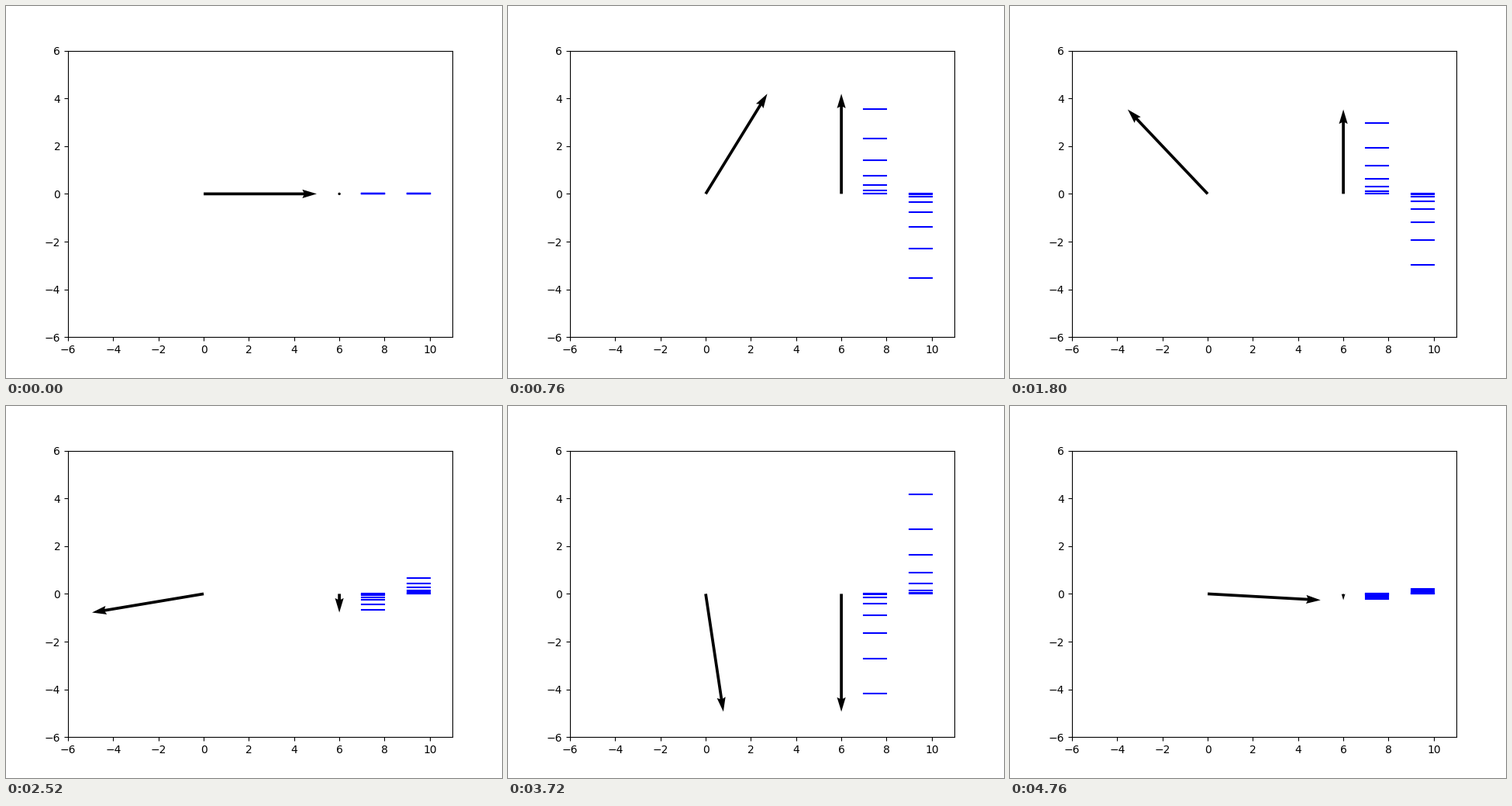
Animation, 640 px wide and 480 px high, one loop 4.8 s. Source, as a matplotlib script:

```python
import numpy as np
import matplotlib.pyplot as plt
from matplotlib.animation import FuncAnimation

FRAMES = 120
INTERVAL = 40
RADIUS = 5

fig, ax = plt.subplots(figsize=(6.4, 4.8), dpi=100)
ax.set_xlim(-6, 11)
ax.set_ylim(-6, 6)

# Rotating vector at the origin, its vertical component at x = 6
arrows = ax.quiver([0, 6], [0, 0], [RADIUS, 0], [0, 0],
                   angles="xy", scale_units="xy", scale=1)

# Bar offsets grow with the cube of their index
heights = 0.01 * (np.arange(8) + 0.5) ** 3


def make_bars(x):
    return [ax.plot([x, x + 1], [0, 0], "b-")[0] for _ in heights]


left_bars = make_bars(7)
right_bars = make_bars(9)


def update(frame):
    angle = 2 * np.pi * frame / FRAMES
    c, s = np.cos(angle), np.sin(angle)
    arrows.set_UVC([RADIUS * c, 0], [RADIUS * s, RADIUS * s])
    for left, right, h in zip(left_bars, right_bars, heights):
        left.set_ydata([h * s, h * s])
        right.set_ydata([-h * s, -h * s])
    return [arrows, *left_bars, *right_bars]


anim = FuncAnimation(fig, update, frames=FRAMES, interval=INTERVAL,
                     repeat=True, repeat_delay=0)
plt.show()
```
